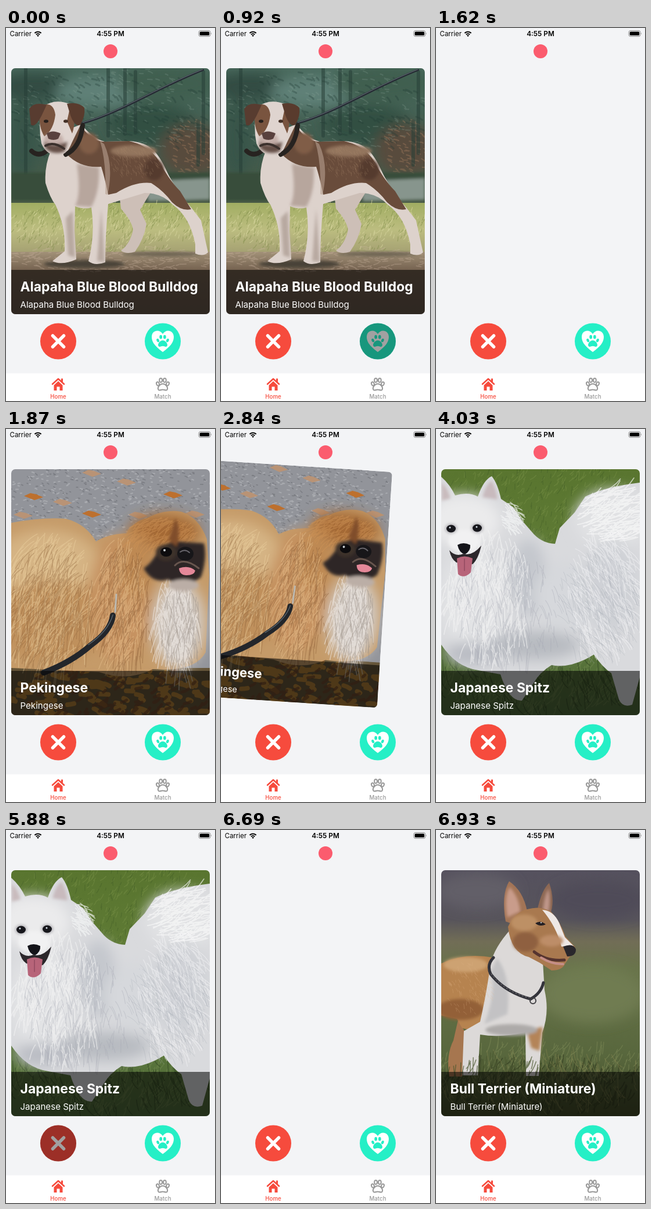
An HTML page that plays this animation: 360x640 px, repeating every 6950 ms.

```html
<!DOCTYPE html>
<html lang="en">
<head>
<meta charset="utf-8">
<title>Dog cards</title>
<style>
  html, body { margin: 0; width: 100%; height: 100%; overflow: hidden; background: #f3f4f6; }
  svg { display: block; width: 100vw; height: 100vh; font-family: Inter, Roboto, sans-serif; }
  .title { font-size: 22.9px; font-weight: 700; fill: #fff; }
  .subtitle { font-size: 15.1px; fill: #fff; }
  .tab { font-size: 9.7px; font-weight: 500; text-anchor: middle; }
</style>
</head>
<body>
<svg id="stage" viewBox="0 0 360 640"></svg>
<script>
const LOOP = 6950;
const stage = document.getElementById('stage');

function random(seed) {
  return () => {
    seed = (seed * 16807) % 2147483647;
    return seed / 2147483647;
  };
}

const shape = (d, fill, extra = '') => `<path d="${d}" fill="${fill}" ${extra}/>`;
const line = (d, color, width, extra = '') =>
  `<path d="${d}" fill="none" stroke="${color}" stroke-width="${width}" stroke-linecap="round" stroke-linejoin="round" ${extra}/>`;
const oval = (x, y, rx, ry, fill, extra = '') =>
  `<ellipse cx="${x}" cy="${y}" rx="${rx}" ry="${ry}" fill="${fill}" ${extra}/>`;
const box = (x, y, w, h, fill, extra = '') =>
  `<rect x="${x}" y="${y}" width="${w}" height="${h}" fill="${fill}" ${extra}/>`;
const soft = (...parts) => `<g filter="url(#soft)">${parts.join('')}</g>`;
const verySoft = (...parts) => `<g filter="url(#verySoft)">${parts.join('')}</g>`;
const gradient = (id, ...stops) => `<linearGradient id="${id}" x2="0" y2="1">${stops.map(([at, color]) =>
  `<stop offset="${at}" stop-color="${color}"/>`).join('')}</linearGradient>`;

// Random strokes inside an ellipse, all leaning roughly the same way (degrees).
function hair(seed, count, [cx, cy, rx, ry], angle, length, color, width = 1, opacity = 0.5) {
  const next = random(seed * 7919);
  let d = '';
  for (let i = 0; i < count; i++) {
    const turn = next() * 2 * Math.PI, r = Math.sqrt(next());
    const x = cx + rx * r * Math.cos(turn), y = cy + ry * r * Math.sin(turn);
    const lean = (angle + (next() - 0.5) * 50) * Math.PI / 180, l = length * (0.5 + next());
    const dx = Math.cos(lean) * l, dy = Math.sin(lean) * l;
    d += `M${x.toFixed(1)} ${y.toFixed(1)}q${(dx * 0.6).toFixed(1)} ${(dy * 0.3).toFixed(1)} ${dx.toFixed(1)} ${dy.toFixed(1)}`;
  }
  return line(d, color, width, `opacity="${opacity}"`);
}

function bulldog() {
  const saddle = 'M128 167C143 186 153 195 170 195L212 194Q245 201 263 227Q280 260 300 280L319 311Q303 315 286 299Q271 279 250 266Q222 263 190 283L176 286Q171 260 164 238Q128 241 104 216Z';
  return box(9, 69, 342, 240, 'url(#forest)') +
    verySoft(
      oval(50, 100, 70, 24, '#314c42'), oval(160, 110, 75, 28, '#5f8077'),
      oval(280, 95, 85, 32, '#3f5f4f'), oval(250, 165, 75, 34, '#324f43'),
      oval(320, 210, 55, 45, '#584b3d'), oval(28, 190, 24, 70, '#395548')) +
    hair(3, 200, [180, 140, 175, 75], 20, 6, '#8aa296', 2, 0.24) +
    hair(8, 150, [180, 150, 175, 90], 35, 8, '#203b32', 3, 0.3) +
    hair(31, 70, [318, 205, 40, 50], 25, 6, '#a27c5c', 2, 0.4) +
    line('M34 70V250M176 70V185M205 70V182M223 75V180M340 75V215M331 160V235', '#273e37', 6, 'opacity=".55"') +
    soft(box(9, 248, 342, 48, '#394e3b'), shape('M240 263L351 258V294L245 297Z', '#87958d')) +
    box(9, 300, 342, 92, 'url(#meadow)') +
    hair(4, 330, [180, 340, 185, 44], -60, 6, '#d9d8a0', 1.2, 0.6) +
    hair(5, 260, [180, 345, 185, 45], -60, 6, '#7d8a47', 1.2, 0.5) +
    box(9, 384, 342, 107, 'url(#dirt)') +
    hair(6, 230, [180, 396, 185, 23], 0, 8, '#cab4a0', 1.5, 0.35) +
    soft(oval(135, 405, 70, 7, '#4a4238'), oval(270, 388, 70, 4, '#6e6552')) +
    line('M132 163C191 148 260 103 339 72', '#262c34', 4) +
    line('M132 162C191 147 260 102 339 71', '#69747b', 1) +
    shape('M196 293L198 310Q216 330 219 346Q214 370 198 382Q207 389 222 384Q238 362 242 336L231 312L251 279Z', '#cdbfb7') +
    shape('M77 211Q66 238 68 266Q76 292 85 303Q103 340 101 383L80 400Q96 408 121 397L118 348L119 306Q135 312 147 308Q154 354 142 400Q153 409 171 402Q171 360 176 302L239 283Q269 283 287 303Q317 324 326 371V387Q340 393 348 385L336 330L319 308Q291 276 276 244C258 205 242 196 212 194L170 195Q148 189 130 165L95 179Z', '#ddd2cc') +
    soft(shape('M122 233Q130 287 119 305L147 307Q162 280 160 239Z', '#b7a69d'),
      shape('M103 326L107 390 119 394 115 314ZM164 310L157 400 170 401Z', '#b8a9a0')) +
    shape(saddle, '#694c3b') +
    soft(oval(220, 211, 40, 10, '#93755d'), oval(143, 198, 17, 18, '#805d47'), oval(255, 243, 17, 18, '#543a2d')) +
    shape('M169 199Q186 235 175 286L171 285Q173 230 162 194Z', '#b7a090', 'opacity=".6"') +
    hair(7, 120, [220, 230, 42, 30], 65, 5, '#ae8e72', 0.8, 0.35) +
    line('M44 211Q56 222 70 211M103 217Q128 205 132 167', '#272320', 8) +
    shape('M62 136Q83 120 109 130Q122 160 113 197Q105 220 85 219Q68 215 61 198Q55 168 62 136Z', '#dfd4cf') +
    shape('M64 132Q82 127 85 149Q82 175 66 186Q56 170 58 145ZM111 133Q123 155 114 181L105 160Z', '#79543f') +
    shape('M70 132Q48 126 40 139L43 166Q50 172 61 151Z', '#583c30') +
    shape('M105 130Q125 126 135 137Q137 151 128 166Q119 171 111 150Z', '#593b2d') +
    soft(oval(82, 193, 17, 13, '#c4afa9'), shape('M65 195Q82 205 106 195L101 212Q82 219 68 207Z', '#655047')) +
    shape('M70 181Q80 174 94 181L90 190Q82 194 73 190Z', '#59413e') +
    oval(69, 160, 4, 2.8, '#261f1c') + oval(103, 160, 4, 2.8, '#443026') +
    line('M68 202Q82 194 100 207', '#3b302c', 4);
}

function pekingese() {
  const leaves = [[45, 115], [95, 125], [145, 75], [145, 145], [205, 90], [225, 147], [285, 112], [323, 145], [27, 147]];
  return box(9, 69, 342, 422, '#92949a') +
    hair(11, 500, [180, 125, 190, 85], 0, 3, '#c0c1c5', 2, 0.5) +
    hair(12, 450, [180, 125, 190, 85], 20, 3, '#66696f', 1.7, 0.5) +
    leaves.map(([x, y], i) => shape(`M${x - 14} ${y}l11 -5 10 2 12 5 -15 5Z`, i % 3 ? '#b99375' : '#bd702e')).join('') +
    box(9, 410, 342, 81, '#645438') +
    hair(13, 140, [190, 455, 190, 48], 15, 10, '#c68a35', 8, 0.75) +
    hair(14, 100, [190, 455, 190, 48], -35, 9, '#6e4427', 5, 0.7) +
    shape('M9 161Q63 151 103 154Q138 163 155 193Q176 180 207 179Q220 158 243 153Q273 137 302 142Q332 151 346 189L350 250L344 383Q325 418 253 412Q212 434 160 417L9 410Z', '#c59b69') +
    verySoft(oval(70, 230, 90, 57, '#d5b484'), oval(80, 330, 94, 72, '#bf905c'),
      oval(196, 293, 52, 110, '#c69260'), oval(272, 176, 62, 30, '#a46935'),
      oval(223, 235, 33, 55, '#be8953'), oval(298, 335, 46, 76, '#d2cac3')) +
    hair(15, 260, [80, 285, 75, 112], 110, 42, '#ecd0a1', 1.4, 0.45) +
    hair(16, 230, [80, 300, 75, 105], 112, 38, '#8b6038', 1.3, 0.35) +
    hair(17, 210, [200, 288, 40, 105], 102, 32, '#e7c08f', 1.4, 0.45) +
    hair(18, 150, [207, 300, 45, 105], 102, 30, '#875a32', 1.2, 0.42) +
    hair(19, 190, [293, 323, 38, 80], 90, 34, '#f0ebe7', 1.5, 0.55) +
    hair(20, 90, [300, 336, 36, 76], 92, 30, '#918982', 1.2, 0.42) +
    hair(21, 160, [272, 176, 58, 26], 145, 20, '#d19657', 1.3, 0.45) +
    soft(shape('M237 239Q254 228 264 203Q288 190 305 194L341 196Q347 221 336 254Q309 277 279 258Q253 267 237 239Z', '#2d2727'),
      oval(276, 212, 18, 14, '#3c3029'), shape('M292 153Q302 169 294 202L280 190Z', '#804e29'),
      oval(306, 268, 26, 10, '#bbaea6')) +
    oval(276, 211, 10, 8, '#0d0c0e') + oval(273, 208, 2, 2, '#cbd0d3') +
    oval(309, 214, 14, 12, '#171619') + line('M300 211Q308 205 316 212', '#68666c', 2) +
    line('M291 234Q306 219 332 239', '#68564e', 3) +
    shape('M298 239Q315 233 326 243Q324 251 311 251Q299 251 298 239Z', '#e48899') +
    line('M190 284L188 314', '#bbb8b0', 3) +
    line('M184 320Q181 346 146 371Q113 400 65 418', '#23262b', 10) +
    line('M184 319Q176 347 142 370', '#566068', 1.5);
}

function spitz() {
  return box(9, 69, 342, 422, 'url(#lawn)') +
    hair(41, 350, [180, 130, 185, 75], -60, 9, '#82974f', 1.3, 0.35) +
    hair(42, 250, [180, 140, 185, 80], -70, 8, '#354f21', 1.3, 0.3) +
    hair(43, 270, [180, 435, 185, 56], -65, 22, '#799054', 1.5, 0.4) +
    hair(44, 200, [180, 440, 185, 55], -110, 20, '#263b1c', 1.5, 0.45) +
    shape('M9 82Q24 95 33 114Q56 107 72 116Q82 87 96 81Q106 93 112 120L133 134L149 158L169 181Q184 196 205 197L213 170L239 143L257 116Q292 99 351 92V426L338 473Q322 479 315 464L302 419Q286 408 272 387Q232 412 199 405Q179 417 168 436L148 466Q126 468 111 421L73 414Q35 409 9 370Z', '#d9dadd') +
    verySoft(oval(48, 158, 63, 45, '#ebebec'), oval(64, 290, 58, 86, '#e2e3e5'),
      oval(159, 255, 31, 66, '#c4c7cd'), oval(225, 285, 56, 57, '#d6d8dc'),
      oval(304, 154, 65, 50, '#e1e2e4'), oval(300, 270, 48, 80, '#cfd1d6'),
      oval(170, 371, 78, 25, '#b8bbc1'), oval(64, 385, 48, 20, '#b9bcc3')) +
    hair(45, 330, [90, 280, 75, 112], 94, 24, '#f6f6f6', 1.5, 0.55) +
    hair(46, 200, [123, 300, 95, 100], 89, 24, '#9da2ad', 1.1, 0.35) +
    hair(47, 260, [285, 270, 60, 108], 62, 25, '#f6f6f7', 1.3, 0.5) +
    hair(48, 190, [275, 300, 70, 90], 58, 22, '#a1a6b0', 1, 0.33) +
    hair(49, 190, [300, 150, 60, 45], -25, 30, '#fbfbfb', 1.5, 0.65) +
    hair(50, 60, [125, 150, 14, 25], 35, 15, '#f4f5f5', 1.4, 0.7) +
    soft(shape('M80 117Q87 92 96 89Q104 104 106 121Z', '#c8babd'), shape('M10 92Q20 101 25 119L10 123Z', '#c9bbbd'),
      oval(48, 192, 27, 19, '#f1f1f2'), oval(26, 171, 10, 8, '#aaa9ae'), oval(71, 170, 10, 8, '#aaa9ae')) +
    oval(26, 171, 8, 6.5, '#17171c') + oval(71, 170, 8, 6.5, '#17171c') +
    oval(24, 169, 1.5, 1.5, '#dce4ec') + oval(70, 168, 1.5, 1.5, '#dce4ec') +
    shape('M23 208Q34 220 47 214Q62 219 78 200Q73 223 63 232L35 229Q26 223 23 208Z', '#2c272b') +
    shape('M36 222Q49 215 63 222L60 246Q48 258 38 249Z', '#b76479') +
    line('M49 223V243', '#8c465c', 1.3) +
    shape('M37 199Q47 193 59 199Q60 209 50 215Q40 213 37 199Z', '#141419');
}

function terrier() {
  return box(9, 69, 342, 422, 'url(#field)') +
    verySoft(oval(70, 105, 70, 31, '#625e68'), oval(280, 120, 86, 33, '#4f4b59'), oval(270, 281, 90, 50, '#707b51')) +
    hair(61, 200, [180, 405, 190, 35], -70, 15, '#87935d', 1.2, 0.45) +
    hair(62, 260, [180, 445, 190, 46], -65, 18, '#283219', 2, 0.45) +
    hair(63, 190, [180, 440, 190, 50], -110, 20, '#86834f', 1.4, 0.42) +
    shape('M38 326L30 361Q17 386 23 423H45L52 350Z', '#a6764f') +
    shape('M9 229Q49 210 99 219L103 330Q67 348 45 340L36 324L9 318Z', '#b6834f') +
    soft(oval(51, 231, 38, 13, '#cda272'), oval(42, 308, 40, 18, '#936139')) +
    shape('M128 171Q101 201 94 229Q88 275 76 329L48 345L45 421H72L76 351Q112 357 154 347L155 422H177L183 348Q196 313 187 275L184 226L155 180Z', '#dcd9d8') +
    soft(shape('M105 220Q130 250 123 316L83 333Q105 277 94 244Z', '#c3c2c4'),
      shape('M156 343L184 338L178 379L164 374Z', '#b48458'), oval(130, 343, 45, 10, '#adaaa9')) +
    shape('M120 157Q112 111 126 88Q150 104 157 139L132 161Z', '#a27456') +
    soft(shape('M123 150Q116 115 127 98Q143 115 145 140Z', '#c99c8b')) +
    shape('M174 139Q182 102 195 91Q206 122 196 147Z', '#8d6854') +
    soft(shape('M184 138Q187 111 194 101Q198 121 194 140Z', '#c0978a')) +
    shape('M124 166Q137 140 157 136Q181 129 199 141Q214 157 223 183L239 200Q244 211 230 218L222 230Q217 241 199 241L179 228L160 218Q129 211 124 166Z', '#a9794f') +
    shape('M183 137Q202 138 212 159L222 184L237 199L216 200Q207 165 183 137Z', '#eee8e5') +
    soft(oval(152, 159, 23, 14, '#bd9065'), oval(154, 192, 22, 17, '#8f6140'), oval(199, 190, 20, 10, '#bd8d68')) +
    line('M169 209Q191 226 221 223', '#56342f', 5) + line('M181 219Q201 231 219 230', '#c58e87', 4) +
    shape('M219 200Q237 193 241 205Q241 217 226 217Z', '#29272c') +
    shape('M171 160Q180 154 189 162Q179 167 171 160Z', '#242024') + oval(181, 159, 1.2, 1, '#d4dbe2') +
    hair(64, 100, [58, 270, 43, 45], 65, 6, '#dfb58b', 0.8, 0.32) +
    line('M99 219Q87 231 94 247Q118 278 163 290Q181 280 185 262', '#34343b', 5) +
    line('M95 247Q118 277 160 288', '#8c8a8d', 1, 'stroke-dasharray="2 4"') +
    `<circle cx="167" cy="293" r="5" fill="none" stroke="#3f3e42" stroke-width="2"/>` +
    hair(65, 70, [110, 420, 95, 14], -80, 20, '#4a5830', 1.5, 0.7);
}

const dogs = [
  ['Alapaha Blue Blood Bulldog', bulldog],
  ['Pekingese', pekingese],
  ['Japanese Spitz', spitz],
  ['Bull Terrier (Miniature)', terrier],
];

const card = ([name, picture]) => `<g class="card" clip-path="url(#cardClip)" visibility="hidden">${picture()}
  ${box(9, 415, 342, 76, '#000', 'opacity=".55"')}
  <text class="title" x="24.5" y="452">${name}</text>
  <text class="subtitle" x="24.5" y="480">${name}</text></g>`;

// Pads and toes of a paw around (x, y).
const paw = (x, y, size, style) => `<g transform="translate(${x} ${y}) scale(${size})" ${style}>
  <path d="M0 -1C5 -1 9 5 8 8C7 12 3 9 0 9S-7 12 -8 8C-9 5 -5 -1 0 -1Z"/>
  <ellipse cx="-8.5" cy="-1" rx="2.3" ry="3.2" transform="rotate(-22 -8.5 -1)"/>
  <ellipse cx="-3.4" cy="-7" rx="2.4" ry="3.4"/><ellipse cx="3.4" cy="-7" rx="2.4" ry="3.4"/>
  <ellipse cx="8.5" cy="-1" rx="2.3" ry="3.2" transform="rotate(22 8.5 -1)"/></g>`;

const button = (x, color, icon) =>
  `<g>${oval(x, 537.5, 31, 31, color)}${icon}${oval(x, 537.5, 31, 31, '#000', 'class="shade" opacity=".37" visibility="hidden"')}</g>`;

const RED = '#f64b3d', TEAL = '#25efc6', GRAY = '#999';

stage.innerHTML = `<defs>
  <clipPath id="cardClip"><rect x="9" y="69" width="342" height="422" rx="7"/></clipPath>
  <filter id="soft"><feGaussianBlur stdDeviation="2.5"/></filter>
  <filter id="verySoft" x="-20%" y="-20%" width="140%" height="140%"><feGaussianBlur stdDeviation="11"/></filter>
  ${gradient('forest', [0, '#496a5d'], [0.6, '#405a4d'], [1, '#4b5b44'])}
  ${gradient('meadow', [0, '#a1ad62'], [0.5, '#bcbd80'], [1, '#a19c70'])}
  ${gradient('dirt', [0, '#a29178'], [0.3, '#74614f'], [1, '#67574a'])}
  ${gradient('lawn', [0, '#59752f'], [0.5, '#617d38'], [1, '#4e693a'])}
  ${gradient('field', [0, '#55515e'], [0.2, '#57545b'], [0.29, '#716d56'], [0.4, '#68734a'], [0.75, '#58673d'], [1, '#424b28'])}
  </defs>
  ${box(0, 0, 360, 640, '#f3f4f6')}
  ${oval(180, 40, 12, 12, '#fb5c6e')}
  ${dogs.map(card).join('')}
  <text x="6.5" y="14" font-size="11.5">Carrier</text>
  <g transform="translate(55 14)">${line('M-5.6 -5.2A8 8 0 0 1 5.6 -5.2M-3.2 -2.8A4.6 4.6 0 0 1 3.2 -2.8', '#000', 2, 'style="stroke-linecap:butt"')}
    ${shape('M0 1L-2 -1.2A3 3 0 0 1 2 -1.2Z', '#000')}</g>
  <text x="180" y="14" font-size="11.8" font-weight="600" text-anchor="middle">4:55 PM</text>
  ${box(332, 4.5, 20, 10, 'none', 'rx="3" stroke="#888"')}
  ${box(333.7, 6.2, 16.6, 6.6, '#000', 'rx="1.6"')}
  ${shape('M353.3 7.7Q355 9.5 353.3 11.3Z', '#888')}
  ${button(90, RED, line('M80.5 528L99.5 547M99.5 528L80.5 547', '#fff', 5.5))}
  ${button(270, TEAL, shape('M270 556C258 547 251 540 251 530C251 518 265 516 270 525C275 516 289 518 289 530C289 540 282 547 270 556Z', '#fff') +
    paw(270, 537, 0.98, `fill="${TEAL}"`))}
  ${box(0, 592.5, 360, 47.5, '#fff')}
  ${line('M80 611L90 602L100 611', RED, 2.6)}${box(95, 601.5, 3, 6, RED)}
  ${shape('M82.5 613L90 606L97.5 613V622H92.5V615.5H87.5V622H82.5Z', RED)}
  ${paw(270, 611.5, 1, `fill="none" stroke="${GRAY}" stroke-width="2"`)}
  <text class="tab" x="90" y="636" fill="${RED}">Home</text>
  <text class="tab" x="270" y="636" fill="${GRAY}">Match</text>`;

const cards = [...stage.querySelectorAll('.card')];
const [rejectShade, likeShade] = stage.querySelectorAll('.shade');

// [start time, card index or -1 for none]
const cardSteps = [[0, 0], [1620, -1], [1870, 1], [3790, -1], [4030, 2], [6690, -1], [6930, 3]];
// [start time, horizontal drag]
const dragSteps = [[0, 0], [2720, -18], [2840, -62], [2960, -135], [3080, -208]];

const valueAt = (steps, time) => steps.filter(([start]) => start <= time).pop()[1];
const show = (node, visible) => node.setAttribute('visibility', visible ? 'visible' : 'hidden');

function render(time) {
  const current = valueAt(cardSteps, time);
  cards.forEach((node, i) => show(node, i === current));
  show(likeShade, time >= 920 && time < 1620);
  show(rejectShade, time >= 5880 && time < 6690);

  const dx = valueAt(dragSteps, time);
  cards[1].setAttribute('transform',
    `translate(${180 + dx} ${280 + dx * 0.235}) rotate(${-dx * 0.06}) scale(${1 + dx * 0.00064}) translate(-180 -280)`);
}

const start = performance.now();
function tick() {
  render((performance.now() - start) % LOOP);
  requestAnimationFrame(tick);
}
tick();
</script>
</body>
</html>
```
